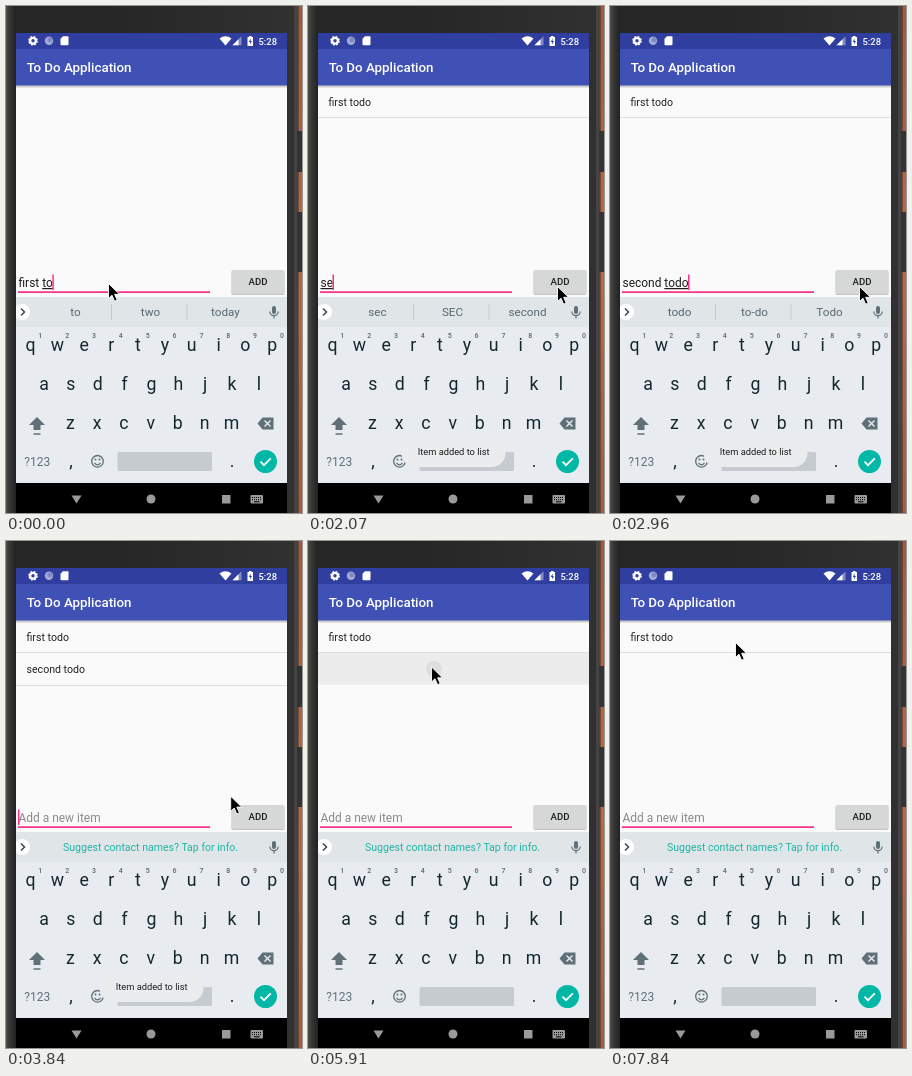
Animation, 296 px wide and 507 px high, one loop 8000 ms. Source, as an HTML page:

```html
<!DOCTYPE html>
<html lang="en">
<head>
<meta charset="utf-8">
<title>To Do Application</title>
<style>
  html, body { margin: 0; width: 100%; height: 100%; overflow: hidden; background: #262626; }
  svg { display: block; width: 296px; height: 507px; font-family: Roboto, sans-serif; }
  text { white-space: pre; }
  .medium { font-weight: 500; }
  .item { font-size: 10.6px; fill: #222; }
  .field { font-size: 11.95px; fill: #1c1c1c; }
  .word { font-size: 11.7px; fill: #566871; text-anchor: middle; }
  .key { font-size: 17.7px; fill: #14272f; text-anchor: middle; }
  .digit { font-size: 7px; font-weight: 500; fill: #566871; text-anchor: middle; }
  .composing { text-decoration: underline; }
</style>
</head>
<body>
<svg viewBox="0 0 296 507">
  <defs>
    <linearGradient id="bezel">
      <stop offset=".35" stop-color="#262626"/><stop offset="1" stop-color="#313131"/>
    </linearGradient>
    <linearGradient id="leftEdge">
      <stop offset="0" stop-color="#55504e"/><stop offset=".3" stop-color="#383838"/><stop offset="1" stop-color="#222"/>
    </linearGradient>
    <linearGradient id="wood" x2="0" y2="1">
      <stop offset="0" stop-color="#a5583a"/><stop offset=".5" stop-color="#bd6844"/><stop offset="1" stop-color="#a85b3d"/>
    </linearGradient>
    <linearGradient id="shade" x2="0" y2="1">
      <stop offset="0" stop-opacity=".28"/><stop offset="1" stop-opacity="0"/>
    </linearGradient>
    <clipPath id="screen"><path d="M10 27h271v480H10z"/></clipPath>
  </defs>

  <!-- phone body -->
  <path fill="url(#bezel)" d="M0 0h296v507H0z"/>
  <path fill="url(#leftEdge)" d="M0 0h10v507H0z"/>
  <path fill="#444" d="M288 0h4v507h-4z"/>
  <path fill="url(#wood)" d="M292.500 0h3.500v507h-3.500z"/>
  <path fill="#333" d="M291 125h5v41h-5zM291 206h5v60h-5z"/>

  <!-- app -->
  <g clip-path="url(#screen)">
    <path fill="#fafafa" d="M10 79h271v212H10z"/>
    <path fill="#303f9f" d="M10 27h271v16H10z"/>
    <path fill="#3f51b5" d="M10 43h271v36.500H10z"/>
    <path fill="url(#shade)" d="M10 79.500h271v3H10z"/>
    <text class="medium" x="20.700" y="66" font-size="13.350" fill="#fff">To Do Application</text>

    <g fill="#fff">
      <circle cx="27" cy="34.800" r="2.800" fill="none" stroke="#fff" stroke-width="2.200"/>
      <circle cx="27" cy="34.800" r="4" fill="none" stroke="#fff" stroke-width="1.600" stroke-dasharray="1.900 1.242"/>
      <circle cx="43" cy="34.700" r="4.200" fill="#a3abd6"/>
      <circle cx="44" cy="33.700" r="2.500" fill="#7f8ac5"/>
      <path d="M57 30.200h4.500q1 0 1 1v7q0 1-1 1h-6q-1 0-1-1v-5.500z"/>
      <path d="M213.500 32.500q6-4.500 12 0l-6 7z"/>
      <path d="M235.500 30.300v9h-9z" opacity=".4"/>
      <path d="M232.500 33.300v6h-6z"/>
      <path d="M243 30h2.500v1h1.500v9h-5.500v-9h1.500z"/>
      <text class="medium" x="252.500" y="38.600" font-size="9.400">5:28</text>
    </g>
    <path d="M244.600 32.500l-1.800 3.500h1.300v2.500l1.800-3.500h-1.300z" fill="#303f9f"/>

    <g id="first">
      <text class="item" x="20.500" y="100">first todo</text>
      <path stroke="#dedede" d="M10 111.500h271"/>
    </g>
    <path id="pressed" fill="#ececec" d="M10 112h271v31.500H10z"/>
    <circle id="ripple" cx="126" cy="128" r="8" fill="#dedede"/>
    <g id="second">
      <text class="item" x="20.500" y="132">second todo</text>
      <path stroke="#dedede" d="M10 144.500h271"/>
    </g>

    <text class="field" id="hint" x="12.500" y="281" style="fill:#8b8b8b">Add a new item</text>
    <text class="field" id="entry" x="12.500" y="281"><tspan></tspan><tspan class="composing"></tspan></text>
    <path fill="#f8348a" d="M12 285.300h192v1.700H12z"/>
    <path id="caret" fill="#f8348a" d="M0 268.500h1.500v15.500H0z"/>
    <rect x="225.500" y="265" width="53" height="24" rx="1.500" fill="#c4c4c4"/>
    <rect x="225.500" y="264" width="53" height="24" rx="1.500" fill="#d6d7d7"/>
    <text class="medium" x="252" y="279" font-size="9.600" fill="#1c1c1c" text-anchor="middle">ADD</text>

    <!-- keyboard -->
    <path fill="#e8ecf0" d="M10 291h271v187H10z"/>
    <path fill="#e0e5e8" d="M10 291h271v30H10z"/>
    <circle cx="16" cy="306" r="8" fill="#fff"/>
    <path d="M15 302.500l3.500 3.500-3.500 3.500" fill="none" stroke="#37474f" stroke-width="1.500"/>
    <g id="words">
      <path stroke="#c5cbcf" d="M105.500 298v16M181 298v16"/>
      <text class="word" x="69.500" y="310"></text>
      <text class="word" x="144.500" y="310"></text>
      <text class="word" x="219.500" y="310"></text>
    </g>
    <text id="contacts" x="57" y="310" font-size="10.550" fill="#1fb5a5">Suggest contact names? Tap for info.</text>
    <rect x="266" y="300" width="4" height="8" rx="2" fill="#5f7079"/>
    <path d="M263.800 305.500a4.200 4.200 0 0 0 8.400 0M268 310v2.500" fill="none" stroke="#5f7079" stroke-width="1.200"/>

    <g id="keys"></g>
    <g fill="#5f7079">
      <path d="M31 411l8 8h-4.500v5h-7v-5H23zM27.500 427.300h7v1.400h-7z"/>
      <path d="M256.500 411.500h11v12h-11l-5-6z"/>
      <path d="M258.500 414.500l6 6m0-6l-6 6" stroke="#e8ecf0" stroke-width="1.400"/>
      <text x="18.300" y="459.700" font-size="12">?123</text>
      <circle cx="91.500" cy="455.300" r="5.800" fill="none" stroke="#5f7079" stroke-width="1.300"/>
      <path d="M88.500 456.800q3 4 6 0" fill="none" stroke="#5f7079" stroke-width="1.200"/>
      <circle cx="89.500" cy="453.500" r="1"/><circle cx="93.500" cy="453.500" r="1"/>
    </g>
    <rect x="111.500" y="446" width="94.500" height="19" rx="1.500" fill="#c6cbcf"/>
    <circle cx="259.500" cy="455.500" r="11.500" fill="#00b8a5"/>
    <path d="M254.500 455.700l3.500 3.500 6.800-6.800" fill="none" stroke="#fff" stroke-width="1.800"/>

    <g id="toast">
      <rect x="93.500" y="432.500" width="104" height="28.500" rx="14" fill="#eaecee"/>
      <text x="109.700" y="449.200" font-size="9.300" fill="#1c1c1c">Item added to list</text>
    </g>

    <!-- navigation bar -->
    <path d="M10 477h271v30H10z"/>
    <g fill="#9a9a9c">
      <path d="M65.500 489.500h10l-5 8zM216 489h8.500v8.500H216z"/>
      <circle cx="145" cy="493" r="4.500"/>
      <rect x="244.500" y="489" width="12.500" height="8.500" rx="1"/>
      <path d="M246 491.500h10M246 493.700h10" stroke="#000" stroke-dasharray="1 1"/>
      <path d="M248 495.300h5.500v1H248z" fill="#000"/>
    </g>
  </g>

  <path id="pointer" d="M0 0v15l3.500-3.300 2.600 6 2.600-1.200-2.600-5.700H11z" fill="#000" stroke="#fff" stroke-width=".9"/>
</svg>

<script>
const LOOP = 8000, TICK = 147.9, LEAD = 12;
const $ = id => document.getElementById(id);

function addKey(label, x, y, cls = "key") {
  const el = document.createElementNS("http://www.w3.org/2000/svg", "text");
  el.setAttribute("class", cls);
  el.setAttribute("x", x);
  el.setAttribute("y", y);
  el.textContent = label;
  $("keys").append(el);
}
const keyRows = [["qwertyuiop", 24.6, 345], ["asdfghjkl", 38, 384], ["zxcvbnm", 64.3, 423]];
for (const [letters, x, y] of keyRows) {
  [...letters].forEach((letter, i) => addKey(letter, x + 26.85 * i, y));
}
[..."1234567890"].forEach((digit, i) => addKey(digit, 34.3 + 26.85 * i, 332, "digit"));
addKey(",", 65, 461);
addKey(".", 226, 461);

// [tick, finished text, word being composed, suggestions]
const typing = [
  [0, "first ", "to", "to two today"],
  [1, "first ", "tod", "tod today Todd"],
  [2, "first ", "todo", "todo to-do Todo"],
  [11, "", "", ""],
  [13, "", "s", "s so see"],
  [14, "", "se", "sec SEC second"],
  [15, "", "seco", "seco second seconds"],
  [16, "", "second", "second seconds Second"],
  [17, "second ", "", "to time one"],
  [18, "second ", "t", "to the time"],
  [19, "second ", "tod", "tod today Todd"],
  [20, "second ", "todo", "todo to-do Todo"],
  [25, "", "", ""]
];
const caretToggles = [5, 8, 23, 25, 28, 30, 33, 36, 40, 44, 47, 50, 53];
// [tick, x, y]
const pointerPath = [
  [0, 102.5, 277.5], [6, 102.5, 277.5], [9, 249.5, 280.5], [25, 249.5, 280.5],
  [30, 125.5, 154.5], [31, 126.5, 155], [32, 126.5, 155], [33, 126.5, 145.5],
  [35, 123.5, 126], [46, 123.5, 126], [53, 125.5, 101.5], [55, 125.5, 101.5]
];

const ramp = (tick, from, to) => Math.min(1, Math.max(0, (tick - from) / (to - from)));
const show = (id, visible) => { $(id).style.display = visible ? "" : "none"; };

function pointerAt(tick) {
  const next = pointerPath.findIndex(p => p[0] > tick);
  const [t0, x0, y0] = pointerPath[next - 1], [t1, x1, y1] = pointerPath[next];
  const k = ramp(tick, t0, t1);
  return [x0 + (x1 - x0) * k, y0 + (y1 - y0) * k];
}

function draw(tick) {
  const [, done, composing, suggestions] = typing.findLast(entry => entry[0] <= tick);
  const [doneSpan, composingSpan] = $("entry").children;
  doneSpan.textContent = done;
  composingSpan.textContent = composing;
  const empty = !(done + composing);
  show("hint", empty);
  show("contacts", empty);
  show("words", !empty);
  const words = suggestions.split(" ");
  $("words").querySelectorAll("text").forEach((el, i) => { el.textContent = words[i] || ""; });

  const caretX = 12 + (empty ? 0 : $("entry").getComputedTextLength());
  $("caret").setAttribute("transform", `translate(${caretX})`);
  show("caret", caretToggles.filter(t => t <= tick).length % 2 === 0);

  show("first", tick >= 11);
  show("second", tick >= 25 && tick < 39);
  show("pressed", tick >= 36 && tick < 42);
  show("ripple", tick >= 36 && tick < 42);
  $("toast").style.opacity = ramp(tick, 10, 13) * (1 - ramp(tick, 35, 39));
  $("pointer").setAttribute("transform", `translate(${pointerAt(tick)})`);
}

const start = performance.now();
function frame() {
  const time = (performance.now() - start) % LOOP;
  draw(Math.floor((time + LEAD) / TICK));
  requestAnimationFrame(frame);
}
frame();
</script>
</body>
</html>
```
